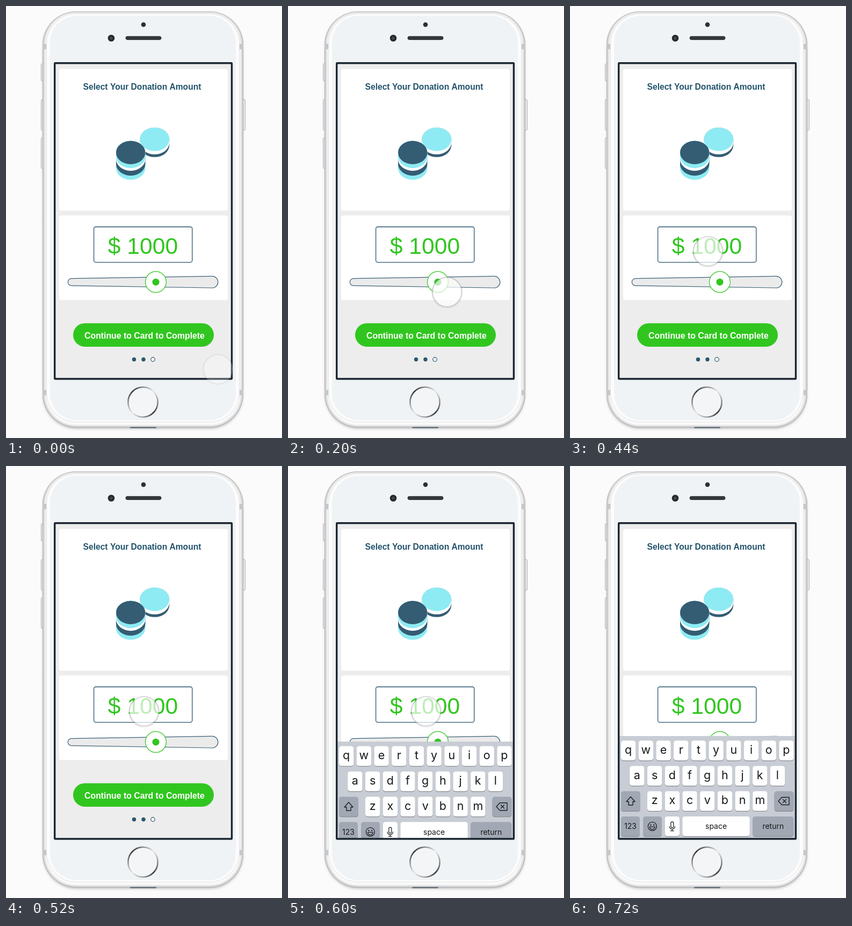
Animation, 514 px wide and 800 px high, one loop 2.72 s. Source, as an HTML page with a canvas:

```html
<!DOCTYPE html>
<html lang="en">
<head>
<meta charset="utf-8">
<title>Donation amount</title>
<style>
html, body { margin: 0; width: 100%; height: 100%; overflow: hidden; background: #fbfbfb; }
canvas { display: block; width: 514px; height: 800px; }
</style>
</head>
<body>
<canvas id="stage"></canvas>
<script>
const W = 514, H = 800, LOOP = 2720, STEP = 20;
const GREEN = '#31c61f', NAVY = '#2b566f', TEAL = '#345c73', AQUA = '#8eebf3';
const SANS = '"Liberation Sans", Arial, sans-serif';
const KEYS = 'Inter, Roboto, sans-serif';

const canvas = document.getElementById('stage');
const ctx = canvas.getContext('2d');
const dpr = window.devicePixelRatio || 1;
canvas.width = W * dpr;
canvas.height = H * dpr;

const clamp = v => Math.min(1, Math.max(0, v));

function paint(fill, stroke, width = 1) {
  if (fill) { ctx.fillStyle = fill; ctx.fill(); }
  if (stroke) { ctx.strokeStyle = stroke; ctx.lineWidth = width; ctx.stroke(); }
}

function box(x, y, w, h, r, fill, stroke, width) {
  ctx.beginPath();
  ctx.roundRect(x, y, w, h, r);
  paint(fill, stroke, width);
}

function disc(x, y, r, fill, stroke, width) {
  ctx.beginPath();
  ctx.arc(x, y, r, 0, Math.PI * 2);
  paint(fill, stroke, width);
}

function label(str, x, y, font, color) {
  ctx.font = font;
  ctx.fillStyle = color;
  ctx.textAlign = 'center';
  ctx.fillText(str, x, y);
}

function line(points, color, width, close) {
  ctx.beginPath();
  points.forEach(([x, y]) => ctx.lineTo(x, y));
  if (close) ctx.closePath();
  ctx.lineJoin = ctx.lineCap = 'round';
  paint(null, color, width);
}

function addStops(gradient, colors) {
  colors.forEach((c, i) => gradient.addColorStop(i / (colors.length - 1), c));
  return gradient;
}

function casing() {
  ctx.save();
  ctx.shadowColor = 'rgba(0,0,0,.4)';
  ctx.shadowBlur = 6 * dpr;
  ctx.shadowOffsetY = 2 * dpr;
  box(71, 14, 368, 765, 60, '#cbccce');
  ctx.restore();

  // rim brightens inwards
  const rim = 7;
  for (let i = 0; i <= rim; i++) {
    const v = Math.round(178 + 72 * Math.sqrt(i / rim));
    box(68 + i, 10 + i * 0.6, 374 - 2 * i, 770.5 - i * 1.4, 62 - i, `rgb(${v},${v},${v + 1})`);
  }
  for (const y of [70, 711]) {
    ctx.fillStyle = '#c6c7c9';
    ctx.fillRect(68, y, 7, 10);
    ctx.fillRect(435, y, 7, 10);
  }
  box(75.5, 14.5, 359, 756, 55, '#fcfcfc', '#e2e3e4', 1);
  box(82, 18, 346, 749, 50, '#f0f3f5');
}

function phone() {
  // side buttons
  for (const [y, h] of [[107, 32], [173, 57], [244, 57]]) {
    box(65.5, y, 5, h, 2, '#eeeeef', '#b2b3b5', 1);
  }
  box(440, 173, 5.5, 57, 2, '#eeeeef', '#b2b3b5', 1);
  casing();

  // camera, sensor, speaker
  disc(256, 34.5, 4.3, '#2c2f33');
  disc(196, 59.5, 6.3, '#25282b');
  disc(196, 59.5, 2.8, '#3c4a4c');
  box(223, 56.3, 66, 6, 3, '#34373b', '#222529', 1);

  // home button
  const ring = addStops(ctx.createConicGradient(0, 255, 733.5),
    ['#8f9193', '#3a3c3f', '#a0a1a3', '#e9eaeb', '#8f9193', '#36383b',
      '#8c8e90', '#e9eaeb', '#8f9193']);
  disc(255, 733.5, 27.6, '#f3f5f6', ring, 2.7);
  disc(255, 733.5, 25.6, null, '#fdfdfd', 1);

  // connector
  box(231, 779.5, 49, 2.5, 1.2, '#65717a');
}

// Stacked discs: each layer is [centre y, colour], lowest first
function coins(x, rx, ry, layers) {
  const top = layers[layers.length - 1][0];
  for (const [y, color] of layers) {
    ctx.beginPath();
    ctx.ellipse(x, y, rx, ry, 0, 0, Math.PI);
    ctx.ellipse(x, top, rx, ry, 0, Math.PI, Math.PI * 2);
    ctx.closePath();
    paint(color);
  }
}

function slider() {
  ctx.beginPath();
  ctx.moveTo(122, 504.6);
  ctx.lineTo(384, 500.4);
  ctx.arc(384, 511.2, 10.8, -Math.PI / 2, Math.PI / 2);
  ctx.lineTo(122, 517.9);
  ctx.arc(122, 511.3, 6.7, Math.PI / 2, Math.PI * 1.5);
  ctx.closePath();
  paint('#ebebeb', '#3d6178', 1.2);
  disc(279, 511, 19.4, '#fff', GREEN, 1.2);
  disc(279, 511.2, 6.5, GREEN);
}

function form() {
  ctx.fillStyle = '#ededed';
  ctx.fillRect(91, 106, 329, 584);
  box(99, 116.5, 314, 262.5, 4, '#fff');
  box(99, 388, 314, 156.5, 4, '#fff');
  label('Select Your Donation Amount', 253.5, 155, `bold 15.6px ${SANS}`, '#23536c');

  coins(276.8, 27.4, 21.8, [[258, TEAL], [253, '#fff'], [246.8, AQUA]]);
  coins(232.2, 27.2, 21.6,
    [[300.2, AQUA], [292.6, TEAL], [283.6, '#fff'], [278.6, AQUA], [271.4, TEAL]]);

  box(163.6, 409, 183.2, 65.6, 3.5, '#fff', NAVY, 1.3);
  label('$ 1000', 255, 459, `42.7px ${SANS}`, GREEN);
  slider();

  box(125, 587.4, 262, 43.6, 21.8, GREEN);
  label('Continue to Card to Complete', 258, 616, `bold 15.8px ${SANS}`, '#fff');
  disc(238.5, 654.5, 3.7, NAVY);
  disc(256, 654.5, 3.7, NAVY);
  disc(273.5, 654.5, 3.8, '#f6f6f6', NAVY, 1.2);
}

function key(x, y, w, text, dark, size = 21.5) {
  box(x, y + 1.2, w, 36.6, 4.5, '#888c93');
  box(x, y, w, 36.6, 4.5, dark ? '#a2a8b3' : '#fff');
  if (!text) return;
  const drop = size > 20 ? 24.3 : 23.3;
  label(text, x + w / 2, y + drop, `${size}px ${KEYS}`, '#15181b');
}

function icons(y3, y4) {
  const ink = '#1c2024';
  // shift
  line([[113, y3 - 8], [121, y3 + 1], [117, y3 + 1], [117, y3 + 7.5],
    [109, y3 + 7.5], [109, y3 + 1], [105, y3 + 1]], ink, 1.4, true);
  // delete
  line([[388, y3], [394.5, y3 - 7], [408, y3 - 7], [408, y3 + 7], [394.5, y3 + 7]], ink, 1.4, true);
  line([[396.5, y3 - 3], [402.5, y3 + 3]], ink, 1.4);
  line([[402.5, y3 - 3], [396.5, y3 + 3]], ink, 1.4);
  // smile
  disc(153.3, y4, 8, null, ink, 1.3);
  disc(150.4, y4 - 2.6, 1.2, ink);
  disc(156.2, y4 - 2.6, 1.2, ink);
  ctx.beginPath();
  ctx.arc(153.3, y4 + 0.8, 4.8, 0, Math.PI);
  ctx.closePath();
  paint(null, ink, 1.2);
  // microphone
  box(187.8, y4 - 8.5, 5, 11, 2.5, null, ink, 1.3);
  ctx.beginPath();
  ctx.arc(190.3, y4, 5.2, 0, Math.PI);
  paint(null, ink, 1.2);
  line([[190.3, y4 + 5.2], [190.3, y4 + 8.3]], ink, 1.2);
  line([[187.3, y4 + 8.3], [193.3, y4 + 8.3]], ink, 1.2);
}

function keyboard(top) {
  ctx.fillStyle = '#c8ccd4';
  ctx.fillRect(91, top, 329, 692 - top);
  const rowY = i => top + 8.5 + i * 46.8;
  const rows = [['qwertyuiop', 95], ['asdfghjkl', 111.2], ['zxcvbnm', 144]];
  rows.forEach(([chars, x], r) => {
    [...chars].forEach((c, i) => key(x + i * 32.7, rowY(r), 27.3, c));
  });
  key(95, rowY(2), 36, '', true);
  key(380.5, rowY(2), 36, '', true);
  key(95, rowY(3), 35, '123', true, 14);
  key(136, rowY(3), 35, '', true);
  key(176.7, rowY(3), 27.3, '');
  key(209.3, rowY(3), 125.5, 'space', false, 14);
  key(340.3, rowY(3), 76, 'return', true, 14);
  icons(rowY(2) + 18.3, rowY(3) + 18.3);
}

function easeInOut(u) {
  u = clamp(u);
  return u < 0.5 ? 4 * u ** 3 : 1 - (2 - 2 * u) ** 3 / 2;
}

function touch(t) {
  const x = 396.5 - 139.5 * easeInOut((t + 66) / 453);
  const y = 673 - 219 * easeInOut((t + 40) / 430);
  ctx.save();
  ctx.globalAlpha = clamp(0.35 + t / 250) * clamp((715 - t) / 60);
  disc(x, y + 1, 27.6, null, 'rgba(120,120,120,.16)', 3);
  disc(x, y, 27, 'rgba(255,255,255,.68)', 'rgba(165,165,165,.55)', 1.2);
  ctx.restore();
}

function draw(t) {
  ctx.setTransform(dpr, 0, 0, dpr, 0, 0);
  ctx.fillStyle = '#fbfbfb';
  ctx.fillRect(0, 0, W, H);
  phone();
  ctx.save();
  ctx.beginPath();
  ctx.rect(91, 106, 329, 584);
  ctx.clip();
  form();
  if (t > 529) keyboard(500 + 190 * Math.exp((529 - t) / 24.4));
  ctx.restore();
  box(90.7, 105.7, 329.8, 584.8, 1, null, '#1b2630', 3.4);
  touch(t);
}

const start = performance.now();
function tick() {
  const t = (performance.now() - start) % LOOP;
  draw(Math.floor(t / STEP) * STEP);
  requestAnimationFrame(tick);
}
tick();
</script>
</body>
</html>
```
